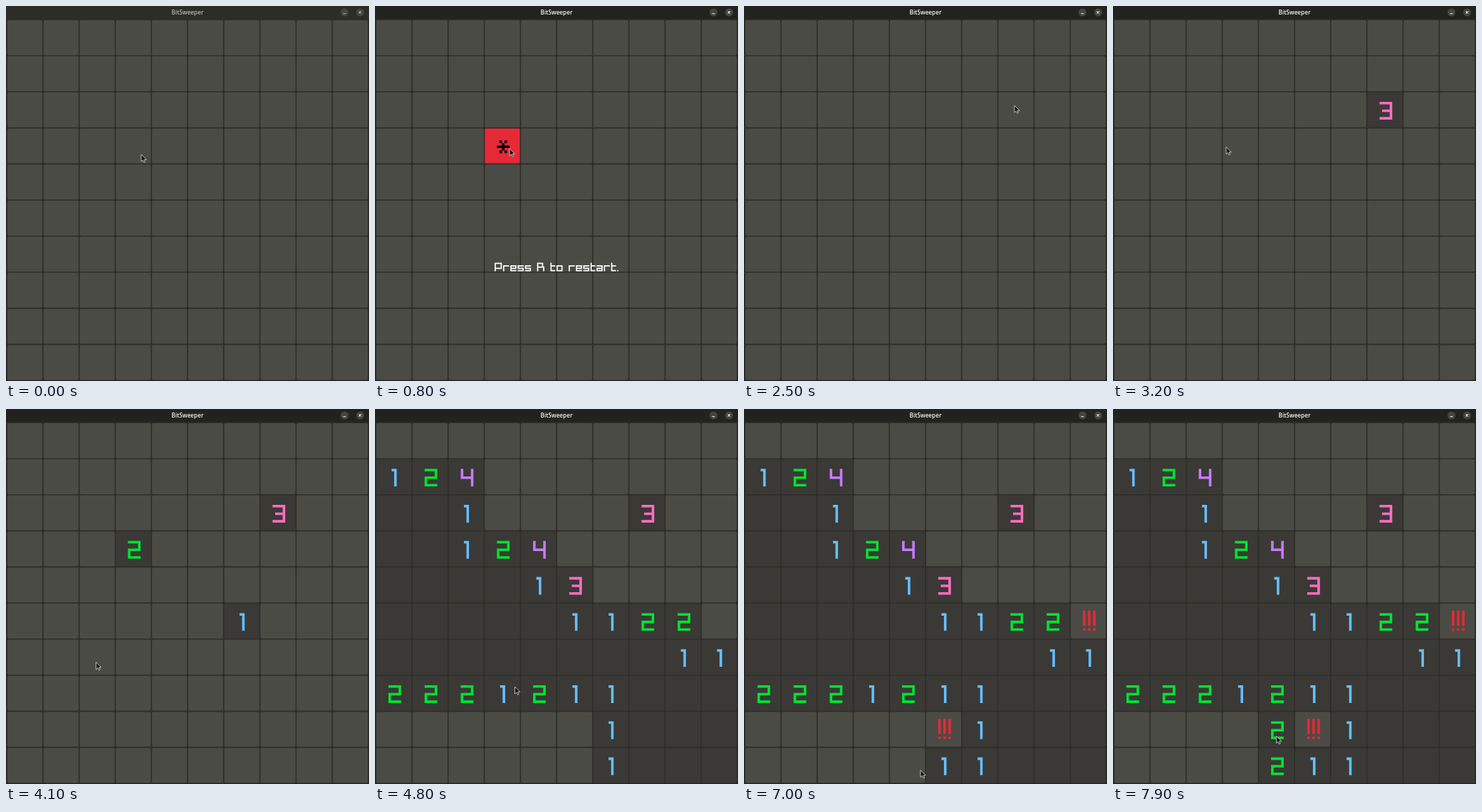
Recreate the animation shown at these times as an HTML page. Size 510x528 px, loop 8000 ms.

```html
<!DOCTYPE html>
<html lang="en">
<head>
<meta charset="utf-8">
<title>BitSweeper</title>
<style>
  html, body { margin: 0; width: 100%; height: 100%; overflow: hidden; background: #2e2e29; }
  svg { display: block; }
  text { font: 600 8.2px "Open Sans", "Noto Sans", sans-serif; text-anchor: middle; }
  .glyphs path { fill: none; stroke-width: 1; stroke-linecap: square; stroke-linejoin: miter; }
</style>
</head>
<body>
<svg width="510" height="528" viewBox="0 0 510 528">
  <rect width="510" height="528" fill="#2e2e29"/>
  <rect id="bar" width="510" height="18.5"/>
  <path d="M.4 18V527.6H509.6V18" fill="none" stroke="#23231f" stroke-width=".8"/>
  <g id="head">
    <text x="255" y="12">BitSweeper</text>
    <circle cx="475.5" cy="9" r="5.6" fill="#45453f"/>
    <circle cx="497.5" cy="9" r="5.6" fill="#45453f"/>
    <path d="M473.5 10.8h4M495.8 7.3l3.4 3.4M499.2 7.3l-3.4 3.4" stroke="currentColor" stroke-width="1.1"/>
  </g>
  <g id="board" class="glyphs"></g>
  <g id="message" class="glyphs" role="img" aria-label="Press R to restart."></g>
  <path id="cursor" d="M0 0V10L2.4 7.9 4 11.4 5.6 10.7 4.1 7.3H7.3Z"
        fill="#111" stroke="#ddd" stroke-width=".8"/>
</svg>
<script>
const $ = id => document.getElementById(id);
const LOOP = 8000, TICK = 100, FOCUS = 300, RESTART = 2500;
const CELL = 50.8, LEFT = 1.1, TOP = 19.2, N = 10;

// Pixel font: strokes on a unit grid, [width, path]
const FONT = {
  ' ': [3, ''],
  '!': [1, 'M0 -1V4M0 6h0'],
  '*': [5, 'M1 1h0M3 1h0M2 2V4M0 3H4M1 5h0M3 5h0'],
  '.': [1, 'M0 6h0'],
  1: [2.5, 'M0 0H1V6'],
  2: [5, 'M0 0H4V3H0V6H4'],
  3: [5, 'M0 0H4V6H0M1 3H4'],
  4: [5, 'M0 0V3H4M4 0V6'],
  P: [6, 'M0 6V0H5V4H0'],
  R: [6, 'M0 6V0H4V3M0 3H5V6'],
  a: [5, 'M0 2H4V6H0V4H4'],
  e: [5, 'M4 6H0V2H4V4H0'],
  o: [5, 'M0 2H4V6H0Z'],
  r: [5, 'M0 6V2H4'],
  s: [5, 'M4 2H0V4H4V6H0'],
  t: [4, 'M0 0V6H3M0 2H3']
};
const COLOR = { 1: '#66bfff', 2: '#00e430', 3: '#ff6dc2', 4: '#c87aff', '!': '#e62937', '*': '#000' };

// Mines as column-row pairs, for the lost game and the next one
const LOST = ['33'];
const MINES = '10 20 30 32 42 52 53 63 64 81 82 84 95 08 18 38 58'.split(' ');

// Pointer stops: arrival, x, y, then what happens to the cell below and after which wait
const STOPS = [
  [0, 190, 209],
  [100, 178, 194, open, 200],
  [1000, 195, 204.5],
  [1500, 380, 140, open, 1100],
  [3200, 159, 198.5, open, 100],
  [3600, 329, 302, open, 100],
  [4100, 126.5, 356.5, open, 100],
  [4500, 188.5, 391],
  [4800, 196.5, 391],
  [5200, 485, 292.5, flag, 200],
  [5500, 485, 329],
  [6100, 286, 446, flag, 200],
  [6700, 272, 504, open, 100],
  [7000, 248, 508.5, open, 200],
  [7700, 229.5, 460.5, open, 0]
];
const TRAVEL = 500;

function around(col, row) {
  const cells = [];
  for (let y = Math.max(0, row - 1); y <= Math.min(N - 1, row + 1); y++)
    for (let x = Math.max(0, col - 1); x <= Math.min(N - 1, col + 1); x++) cells.push([x, y]);
  return cells;
}

// '#' is a covered cell, '-' an empty open one
function open(grid, mines, col, row) {
  if (grid[row][col] !== '#') return;
  const isMine = ([x, y]) => mines.includes(`${x}${y}`);
  if (isMine([col, row])) { grid[row][col] = '*'; return; }
  const cells = around(col, row), count = cells.filter(isMine).length;
  grid[row][col] = count ? `${count}` : '-';
  if (!count) cells.forEach(([x, y]) => open(grid, mines, x, y));
}

function flag(grid, mines, col, row) {
  grid[row][col] = '!';
}

function boardAt(t) {
  const grid = Array.from({ length: N }, () => Array(N).fill('#'));
  const since = t < RESTART ? 0 : RESTART, mines = since ? MINES : LOST;
  for (const [at, x, y, act, wait] of STOPS) {
    if (!act || at + wait < since || at + wait > t) continue;
    act(grid, mines, Math.floor((x - LEFT) / CELL), Math.floor((y - TOP) / CELL));
  }
  return grid;
}

function pointerAt(t) {
  const i = STOPS.findIndex(s => s[0] > t);
  if (i < 0) return STOPS[STOPS.length - 1].slice(1, 3);
  const [t0, x0, y0, , wait = 0] = STOPS[i - 1], [t1, x1, y1] = STOPS[i];
  const from = Math.max(t0 + wait, t1 - TRAVEL);
  const u = Math.max(0, (t - from) / (t1 - from)), e = u * u * (3 - 2 * u);
  return [x0 + (x1 - x0) * e, y0 + (y1 - y0) * e];
}

function write(str, x, y, unit, color) {
  let out = '';
  for (const ch of str) {
    const [w, d] = FONT[ch];
    out += `<path d="${d}" stroke="${color}" transform="translate(${x + unit / 2} ${y + unit / 2}) scale(${unit})"/>`;
    x += (w + 1) * unit;
  }
  return out;
}

function drawCell(mark, col, row) {
  const x = LEFT + col * CELL, y = TOP + row * CELL, unit = 3.56;
  const fill = mark === '*' ? '#e62937' : '#!'.includes(mark) ? '#4b4b45' : '#3a3936';
  let out = `<rect x="${x + .8}" y="${y + .8}" width="${CELL - 1.6}" height="${CELL - 1.6}" rx="1.8" fill="${fill}"/>`;
  if (COLOR[mark]) {
    const str = mark === '!' ? '!!!' : mark;
    const width = FONT[mark][0] * str.length + str.length - 1;
    out += write(str, x + CELL / 2 + 1.3 - width * unit / 2, y + 14.2, unit, COLOR[mark]);
  }
  return out;
}

const mix = (a, b, u) => `rgb(${a.map((v, i) => Math.round(v + (b[i] - v) * u))})`;

let shown = '';
function render(time) {
  const t = Math.floor(time % LOOP / TICK) * TICK;
  const grid = boardAt(t), key = grid.join();
  if (key !== shown) {
    $('board').innerHTML = grid.map((r, y) => r.map((m, x) => drawCell(m, x, y)).join('')).join('');
    $('message').style.display = key.includes('*') ? '' : 'none';
    shown = key;
  }
  const focus = Math.min(1, Math.max(0, (t - FOCUS + TICK) / 300));
  const ink = mix([184, 184, 176], [248, 248, 242], focus);
  $('bar').setAttribute('fill', mix([45, 45, 40], [34, 34, 30], focus));
  $('head').setAttribute('fill', ink);
  $('head').setAttribute('color', ink);
  $('cursor').setAttribute('transform', `translate(${pointerAt(t)})`);
}

$('message').innerHTML = write('Press R to restart.', 168, 361.6, 1.706, '#fff');

const start = performance.now();
function frame() {
  render(performance.now() - start);
  requestAnimationFrame(frame);
}
frame();
</script>
</body>
</html>
```
